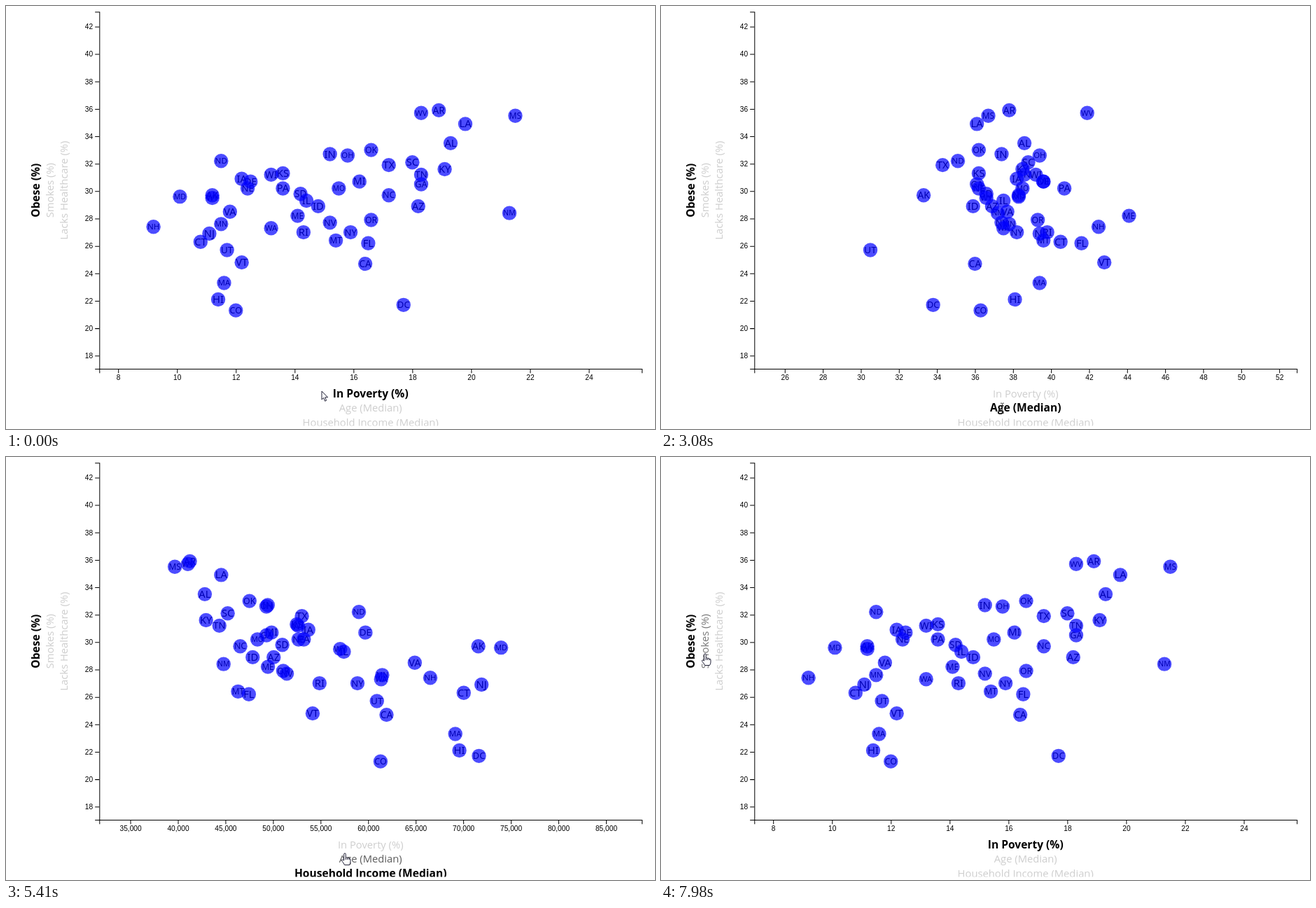
An HTML page for the animation above (8000 ms loop, 927 by 604 pixels).

```html
<!DOCTYPE html>
<html lang="en">
<head>
<meta charset="utf-8">
<title>State scatter plot</title>
<style>
  html, body { margin: 0; width: 100%; height: 100%; overflow: hidden; background: #fff; }
  svg { display: block; }
  text { text-anchor: middle; }
  .tick { font: 10px "Liberation Sans", Arial, sans-serif; }
  .label { font-family: "Open Sans", "Noto Sans", sans-serif; }
  .state { font-family: "Noto Sans", sans-serif; }
</style>
</head>
<body>
<svg id="stage" width="927" height="604" viewBox="0 0 927 604">
  <clipPath id="edge"><rect x="-100" y="-20" width="900" height="600"/></clipPath>
  <g transform="translate(133.3 8.3) scale(1.0195)">
    <g id="chart" clip-path="url(#edge)"></g>
  </g>
  <g id="cursor" stroke-linejoin="round">
    <path id="arrow" d="M0 0V12L2.7 9.5 4.6 14.2 6.6 13.3 4.7 8.8H8.6Z" fill="#fff" stroke="#222238"/>
    <path id="hand" d="M-1.3 10V1.2A1.3 1.3 0 0 1 1.3 1.2V6.5Q2.4 5 3.6 6.8Q5 5.7 6 7.3Q8 6.8 8 9V12Q8 14 6.5 16.5H-.5Q-1 14.5-4.5 10.5Q-4.8 8-1.3 10ZM1.3 6.5V9M3.6 6.8V9M6 7.3V9.2" fill="#fff" stroke="#222238"/>
    <path id="beam" d="M-2.5-7H-.6L0-6.5.6-7H2.5M0-6.5V6.5M-2.5 7H-.6L0 6.5.6 7H2.5" fill="none" stroke="#444"/>
  </g>
  <circle id="press" r="11" fill="#ff0" opacity=".62"/>
</svg>
<script>
const LOOP = 8000, W = 760, H = 500, DURATION = 1000;
const byId = id => document.getElementById(id);
const chart = byId("chart");

const states = ("AL AK AZ AR CA CO CT DE DC FL GA HI ID IL IN IA KS KY LA ME MD MA MI MN MS MO " +
  "MT NE NV NH NJ NM NY NC ND OH OK OR PA RI SC SD TN TX UT VT VA WA WV WI WY").split(" ");
const poverty = [19.3, 11.2, 18.2, 18.9, 16.4, 12, 10.8, 12.5, 17.7, 16.5, 18.3, 11.4, 14.8,
  14.4, 15.2, 12.2, 13.6, 19.1, 19.8, 14.1, 10.1, 11.6, 16.2, 11.5, 21.5, 15.5,
  15.4, 12.4, 15.2, 9.2, 11.1, 21.3, 15.9, 17.2, 11.5, 15.8, 16.6, 16.6, 13.6,
  14.3, 18, 14.2, 18.3, 17.2, 11.7, 12.2, 11.8, 13.2, 18.3, 13.2, 11.2];
const age = [38.6, 33.3, 36.9, 37.8, 36, 36.3, 40.5, 39.6, 33.8, 41.6, 36.1, 38.1, 35.9,
  37.5, 37.4, 38.2, 36.2, 38.5, 36.1, 44.1, 38.3, 39.4, 39.6, 37.8, 36.7, 38.5,
  39.6, 36.2, 37.4, 42.5, 39.4, 37.2, 38.2, 38.3, 35.1, 39.4, 36.2, 39.3, 40.7,
  39.8, 38.8, 36.6, 38.6, 34.3, 30.5, 42.8, 37.7, 37.5, 41.9, 39.2, 36.6];
const income = [42830, 71583, 50068, 41262, 61933, 61303, 70048, 59716, 71648, 47463, 49321,
  69592, 47861, 57444, 49446, 53712, 52504, 42958, 44555, 49462, 73971, 69160, 49847, 61481,
  39680, 48363, 46328, 52686, 51450, 66532, 71919, 44803, 58878, 46556, 59029, 49308, 47529,
  51075, 53234, 54891, 45238, 50979, 44361, 53035, 60922, 54166, 64902, 61366, 41059, 52622, 57055];
const obesity = [33.5, 29.7, 28.9, 35.9, 24.7, 21.3, 26.3, 30.7, 21.7, 26.2, 30.5, 22.1, 28.9,
  29.3, 32.7, 30.9, 31.3, 31.6, 34.9, 28.2, 29.6, 23.3, 30.7, 27.6, 35.5, 30.2,
  26.4, 30.2, 27.7, 27.4, 26.9, 28.4, 27, 29.7, 32.2, 32.6, 33, 27.9, 30.2,
  27, 32.1, 29.8, 31.2, 31.9, 25.7, 24.8, 28.5, 27.3, 35.7, 31.2, 29.5];

function add(parent, tag, attrs, content) {
  const el = document.createElementNS("http://www.w3.org/2000/svg", tag);
  for (const k in attrs) el.setAttribute(k, attrs[k]);
  if (content) el.textContent = content;
  parent.appendChild(el);
  return el;
}

function scale(values, size) {
  const lo = Math.min(...values) * 0.8, hi = Math.max(...values) * 1.2;
  return v => (v - lo) / (hi - lo) * size;
}

const lerp = (a, b, k) => a + (b - a) * k;
const clamp = k => Math.max(0, Math.min(1, k));
const cubic = k => k < 0.5 ? 4 * k ** 3 : 1 - (2 - 2 * k) ** 3 / 2;

// Axes
const yScale = scale(obesity, H);
add(chart, "path", { d: `M-6 ${H + .5}H.5V.5H-6M.5 ${H + 6}V${H + .5}H${W + .5}V${H + 6}`, fill: "none", stroke: "#000" });
for (let v = 18; v <= 42; v += 2) {
  const g = add(chart, "g", { transform: `translate(0 ${H - yScale(v) + .5})` });
  add(g, "path", { d: "M-6 0H0", stroke: "#000" });
  add(g, "text", { x: -9, dy: ".32em", class: "tick", style: "text-anchor:end" }, String(v));
}

function xAxis(values, first, last, step) {
  const ticks = [];
  for (let v = first; v <= last; v += step) {
    const el = add(chart, "g", {});
    add(el, "path", { d: "M0 0V6", stroke: "#000" });
    add(el, "text", { y: 9, dy: ".71em", class: "tick" }, v.toLocaleString("en-US"));
    ticks.push({ v, el });
  }
  return { values, ticks, at: scale(values, W) };
}
const axes = {
  poverty: xAxis(poverty, 8, 24, 2),
  age: xAxis(age, 26, 52, 2),
  income: xAxis(income, 35000, 85000, 5000)
};

// Axis labels
const labels = {};
function label(name, content, x, y, turn) {
  labels[name] = add(chart, "text", { class: "label", x, y, transform: `rotate(${turn})` }, content);
}
label("poverty", "In Poverty (%)", W / 2, H + 40, 0);
label("age", "Age (Median)", W / 2, H + 60, 0);
label("income", "Household Income (Median)", W / 2, H + 80, 0);
label("obesity", "Obese (%)", -H / 2, -84, -90);
label("smokes", "Smokes (%)", -H / 2, -64, -90);
label("healthcare", "Lacks Healthcare (%)", -H / 2, -44, -90);

// Names lie beneath the translucent dots
const names = states.map((s, i) => {
  const el = add(chart, "text", { class: "state", y: H - yScale(obesity[i]), dy: ".34em", "font-size": 12 }, s);
  el.setAttribute("font-size", Math.min(14.5, 12 * 17 / el.getComputedTextLength()).toFixed(2));
  return el;
});
const dots = states.map((s, i) =>
  add(chart, "circle", { r: 10, cy: H - yScale(obesity[i]), fill: "#00f", opacity: .7 }));

// Timeline
const switches = [[1990, "poverty", "age"], [4390, "age", "income"], [6500, "income", "poverty"]];
const presses = [[1910, 1990], [4310, 4390], [6410, 6500]];
const pointer = [[0, "arrow"], [1000, "hand", "age"], [1990, "beam"], [3450, "hand", "income"],
  [4390, "beam"], [5250, "hand", "age"], [5800, "hand", "poverty"], [6500, "beam"],
  [6600, "arrow"], [7860, "hand", "smokes"]];
const route = [[0, 451, 550], [580, 451, 550], [1220, 486, 572], [1910, 486, 572], [2100, 487.5, 574],
  [3050, 487.5, 574], [3500, 484, 588], [3860, 482, 590], [5170, 482, 590], [5390, 484, 566],
  [5700, 484, 566], [5950, 484, 557], [6110, 483, 556], [6520, 483, 556], [6720, 438, 544],
  [6760, 438, 544], [7500, 80, 320], [7950, 63, 281], [LOOP, 63, 281]];

function place(t) {
  const i = Math.max(1, route.findIndex(p => p[0] > t));
  const [t0, x0, y0] = route[i - 1], [t1, x1, y1] = route[i];
  const k = (t - t0) / (t1 - t0), e = k * k * (3 - 2 * k);
  return [lerp(x0, x1, e), lerp(y0, y1, e)];
}

function drawChart(t) {
  const [start, from, to] = switches.filter(s => s[0] <= t).pop() || switches[0];
  const e = cubic(clamp((t - start) / DURATION));
  const a = axes[from], b = axes[to];
  for (const name in axes) {
    const opacity = name === from ? 1 - e : name === to ? e : 0;
    for (const { v, el } of axes[name].ticks) {
      const x = lerp(a.at(v), b.at(v), e) + .5;
      const shown = opacity > 0.001 && x > -150 && x < 850;
      el.setAttribute("display", shown ? "inline" : "none");
      if (!shown) continue;
      el.setAttribute("transform", `translate(${x} ${H})`);
      el.setAttribute("opacity", opacity);
    }
  }
  states.forEach((s, i) => {
    const x = lerp(a.at(a.values[i]), b.at(b.values[i]), e);
    dots[i].setAttribute("cx", x);
    names[i].setAttribute("x", x);
  });
  return t < start ? from : to;
}

function render(t) {
  const active = drawChart(t);
  const [since, kind, over] = pointer.filter(p => p[0] <= t).pop();

  for (const name in labels) {
    const bold = name === active || name === "obesity";
    const fade = name === over ? clamp((t - since) / 200) : 0;
    const grey = bold ? 0 : Math.round(lerp(206, 66, fade));
    const el = labels[name];
    el.setAttribute("fill", `rgb(${grey},${grey},${grey})`);
    el.setAttribute("font-weight", bold ? 700 : 400);
    el.setAttribute("font-size", bold ? 15.3 : 14.5);
  }

  const [x, y] = place(t);
  byId("cursor").setAttribute("transform", `translate(${x} ${y})`);
  for (const id of ["arrow", "hand", "beam"]) byId(id).setAttribute("display", id === kind ? "inline" : "none");
  const press = byId("press");
  press.setAttribute("cx", x);
  press.setAttribute("cy", y + 2);
  press.setAttribute("display", presses.some(p => t >= p[0] && t < p[1]) ? "inline" : "none");
}

const begin = performance.now();
function frame() {
  render((performance.now() - begin) % LOOP);
  requestAnimationFrame(frame);
}
frame();
</script>
</body>
</html>
```
